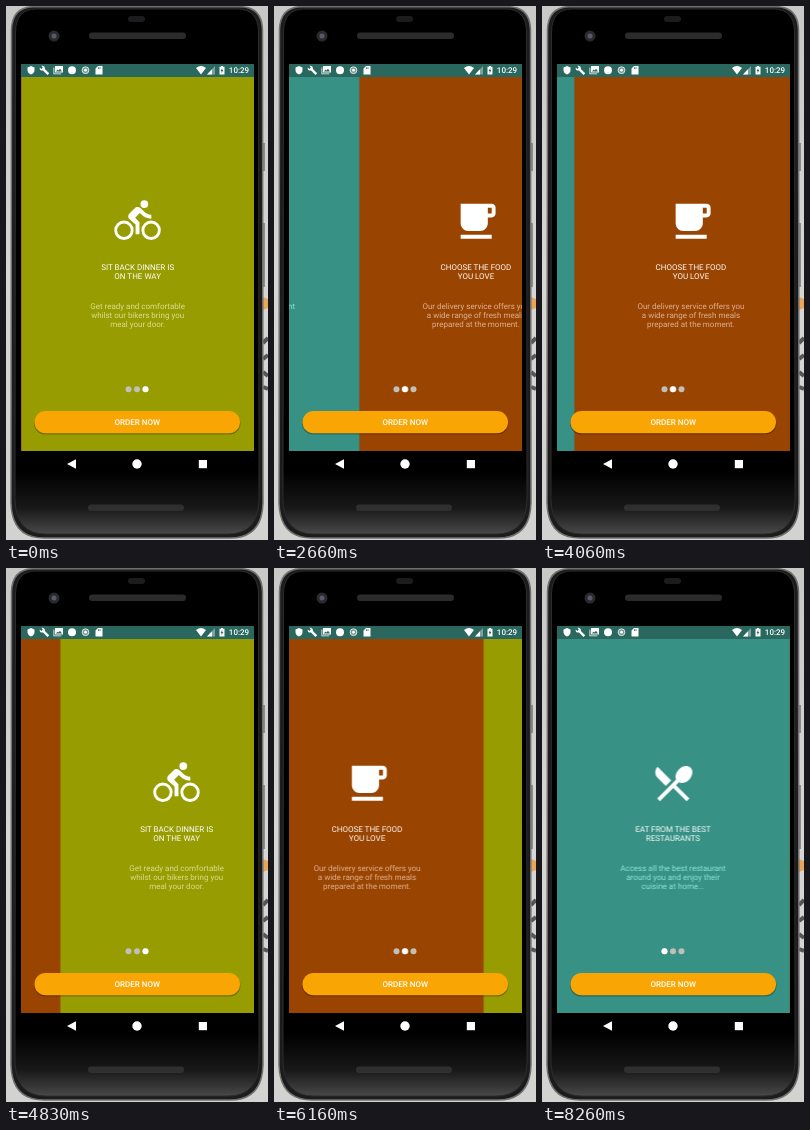
Recreate the animation shown at these times as an HTML page. Size 262 by 534 pixels, loop 8.33 s.

```html
<!DOCTYPE html>
<html lang="en">
<head>
<meta charset="utf-8">
<title>Food delivery onboarding</title>
<style>
  html, body { margin: 0; height: 100%; overflow: hidden; background: #cbcbca; }
  svg { display: block; width: 100vw; height: 100vh; }
  text { font: 8px Roboto, Arial, sans-serif; fill: #fff; text-anchor: middle; text-rendering: geometricPrecision; }
  .label { font-weight: 500; }
  .olive .note { fill: #dbde8e; }
  .brown .note { fill: #e2b294; }
  .teal .note { fill: #8ee8d8; }

  .strip, .current { animation: swipe 8330ms infinite; }
  .strip { animation-timing-function: cubic-bezier(.2, .7, .3, 1); }
  .current { animation-name: select; animation-timing-function: step-end; }

  /* Each swipe: finger drag, release, settle. One page is 233px wide. */
  @keyframes swipe {
    0% { transform: translateX(-466px); animation-timing-function: linear; }
    2.4% { transform: translateX(-376px); }
    8.4%, 10.08% { transform: translateX(-233px); }
    10.08% { animation-timing-function: ease-in; }
    14.17% { transform: translateX(-325px); }
    20.17%, 21.85% { transform: translateX(-466px); }
    21.85%, 22.69% { animation-timing-function: linear; }
    22.69% { transform: translateX(-435.5px); }
    24.73% { transform: translateX(-360px); }
    30.25%, 31.09% { transform: translateX(-233px); }
    31.09% { animation-timing-function: ease-in; }
    34.45% { transform: translateX(-130px); }
    39.5%, 42.86% { transform: translateX(0); }
    42.86% { animation-timing-function: ease-in; }
    46.22% { transform: translateX(-100px); }
    52.1%, 52.94% { transform: translateX(-233px); }
    52.94% { animation-timing-function: ease-in; }
    56.42% { transform: translateX(-350px); animation-timing-function: linear; }
    57.98% { transform: translateX(-426px); }
    61.34%, 63.87% { transform: translateX(-466px); }
    63.87% { animation-timing-function: ease-in; }
    69.63% { transform: translateX(-365px); animation-timing-function: linear; }
    73.95% { transform: translateX(-272px); }
    76.47%, 76.83% { transform: translateX(-233px); }
    76.83% { animation-timing-function: ease-in; }
    80.67% { transform: translateX(-120px); animation-timing-function: linear; }
    83.19% { transform: translateX(-15px); }
    86.55%, 100% { transform: translateX(0); }
  }
  @keyframes select {
    0%, 14.17%, 56.42% { transform: translateX(17px); }
    2.4%, 24.73%, 46.22%, 69.63% { transform: translateX(8.5px); }
    34.45%, 80.67%, 100% { transform: translateX(0); }
  }
</style>
</head>
<body>
<svg viewBox="0 0 262 534" preserveAspectRatio="none">
  <defs>
    <clipPath id="screen"><path d="M15 71h233v373.5H15z"/></clipPath>
    <linearGradient id="wall" x2="0" y2="1">
      <stop stop-color="#c8c8c7"/><stop offset=".5" stop-color="#d6d6d5"/><stop offset="1" stop-color="#d2d2d1"/>
    </linearGradient>
    <linearGradient id="glass" x2="0" y2="1">
      <stop offset=".88"/><stop offset=".95" stop-color="#181818"/><stop offset="1" stop-color="#484848"/>
    </linearGradient>
  </defs>

  <!-- Surroundings -->
  <path fill="url(#wall)" d="M0 0h262v534H0z"/>
  <path fill="#e9a65a" d="M257 291l5 2v9l-5 2z"/>
  <path fill="none" stroke="#555557" stroke-width="4" d="M257 337l5-5M257 353l5-4M257 366l5 4M257 381l5 2"/>

  <!-- Phone -->
  <path fill="#8c8c8c" d="M256 137h3v28h-3zM256 217h3v64h-3z"/>
  <path fill="#1c1c1c" stroke="#707070" stroke-width="1.5" d="M28 .7H234Q256 .7 256.500 24L257 497Q256 532 224 532H38Q6 532 5 497L5.500 24Q6 .7 28 .7z"/>
  <path fill="url(#glass)" stroke="#2c2c2c" d="M30 3H232Q252 3 252.500 26L253 494Q252 528 222 528H40Q10 528 9 494L9.500 26Q10 3 30 3z"/>
  <rect x="83" y="26.500" width="97" height="6.500" rx="3.200" fill="#2b2b2c"/>
  <rect x="82" y="498.500" width="96" height="6.500" rx="3.200" fill="#2f2f30"/>
  <rect x="122" y="10" width="17" height="6" rx="3" fill="#1c1c1e"/>
  <circle cx="48" cy="30" r="5.500" fill="#2a2a2d"/>
  <circle cx="48" cy="30" r="2.500" fill="#555a6c"/>

  <!-- Pages -->
  <g clip-path="url(#screen)">
    <g class="strip">
      <g class="teal">
        <path fill="#379185" d="M14 71h235v374H14z"/>
        <path fill="#fff" transform="translate(108 192) scale(1.94)" d="M8.1 13.34l2.83-2.83L3.91 3.5c-1.56 1.56-1.56 4.09 0 5.66zM14.88 11.53c1.53.71 3.68.21 5.27-1.38 1.91-1.91 2.28-4.65.81-6.12-1.46-1.46-4.2-1.1-6.12.81-1.59 1.59-2.09 3.74-1.38 5.27L3.7 19.87l1.41 1.41L12 14.41l6.88 6.88 1.41-1.41L13.41 13z"/>
        <text x="131" y="263.7">EAT FROM THE BEST</text>
        <text x="131" y="273.1">RESTAURANTS</text>
        <text class="note" x="131" y="302.5">Access all the best restaurant</text>
        <text class="note" x="131" y="311.8">around you and enjoy their</text>
        <text class="note" x="131" y="321.1">cuisine at home...</text>
      </g>
      <g class="brown" transform="translate(233)">
        <path fill="#994400" d="M15 71h234v374H15z"/>
        <path fill="#fff" fill-rule="evenodd" transform="translate(108.5 192) scale(1.94)" d="M20 3H4v10c0 2.21 1.79 4 4 4h6c2.21 0 4-1.79 4-4v-3h2c1.11 0 2-.89 2-2V5c0-1.11-.89-2-2-2zm0 5h-2V5h2zM4 19h16v2H4z"/>
        <text x="131.5" y="263.7">CHOOSE THE FOOD</text>
        <text x="131.5" y="273.1">YOU LOVE</text>
        <text class="note" x="131.5" y="302.5">Our delivery service offers you</text>
        <text class="note" x="131.5" y="311.8">a wide range of fresh meals</text>
        <text class="note" x="131.5" y="321.1">prepared at the moment.</text>
      </g>
      <g class="olive" transform="translate(466)">
        <path fill="#979c00" d="M15 71h234v374H15z"/>
        <g fill="#fff" transform="translate(107.8 191.3) scale(1.94)">
          <g fill="none" stroke="#fff" stroke-width="1.5">
            <circle cx="5" cy="17" r="4.25"/><circle cx="19" cy="17" r="4.25"/>
          </g>
          <circle cx="15.5" cy="3.5" r="2"/>
          <path d="M10.8 10.5l2.4-2.4.8.8c1.3 1.3 3 2.1 5.1 2.1V9c-1.5 0-2.7-.6-3.6-1.5l-1.9-1.9c-.5-.4-1-.6-1.6-.6s-1.1.2-1.4.6L7.8 8.4c-.4.4-.6.9-.6 1.4 0 .6.2 1.1.6 1.4L11 14v5h2v-6.2z"/>
        </g>
        <text x="131.2" y="263.7">SIT BACK DINNER IS</text>
        <text x="131.2" y="273.1">ON THE WAY</text>
        <text class="note" x="131.2" y="302.5">Get ready and comfortable</text>
        <text class="note" x="131.2" y="311.8">whilst our bikers bring you</text>
        <text class="note" x="131.2" y="321.1">meal your door.</text>
      </g>
    </g>
  </g>

  <!-- Page dots and button -->
  <g fill="#c0c0b8">
    <circle cx="122.5" cy="383.3" r="3"/><circle cx="131" cy="383.3" r="3"/><circle cx="139.5" cy="383.3" r="3"/>
  </g>
  <circle class="current" cx="122.5" cy="383.3" r="3" fill="#fff"/>
  <rect x="28" y="406.5" width="206.5" height="22" rx="11" fill="#000" opacity=".28"/>
  <rect x="28.5" y="405" width="205.5" height="22.3" rx="11.1" fill="#f9a504"/>
  <text class="label" x="131.3" y="419">ORDER NOW</text>

  <!-- Status bar -->
  <path fill="#29675f" d="M15 58h233v13H15z"/>
  <g fill="#fff">
    <path d="M25 60l3.5 1.5v2.5q0 3-3.5 4.5-3.5-1.5-3.5-4.5v-2.5z"/>
    <path d="M37 64.5l4.5 4.5 1.7-1.7-4.3-4.3q.3-2.800-2.500-3.300h-1l1.400 1.700-1.400 1.500-1.700-1.500q-.5 3.500 3.300 3.100z"/>
    <path fill-rule="evenodd" d="M49 60h8v6.500h-8zm1 5.500h6l-2-2.700-1.500 1.700-1-1zM47.500 61.500h.8v6h7v.8h-7.800z"/>
    <circle cx="66" cy="64.2" r="4"/>
    <circle cx="79.5" cy="64.2" r="3.4" fill="#789b96" stroke="#dbe7e5"/>
    <circle cx="79.5" cy="64.2" r="1.4"/>
    <path fill-rule="evenodd" d="M92 60h4.500v8.500h-7v-6zm0 1.300h.8v1.700H92zm1.600 0h.8v1.700h-.8z"/>
    <path d="M190 62q5-4 10 0l-5 6.500z"/>
    <path opacity=".4" d="M209 60v8.500h-8z"/>
    <path d="M206 63.200v5.300h-5z"/>
    <path fill-rule="evenodd" d="M215 60h2v.8h1.500v7.700h-5v-7.700h1.500zm1.300 2l-1.700 3h1v2.300l1.700-3.200h-1z"/>
  </g>
  <text class="label" x="233" y="67.2">10:29</text>

  <!-- Navigation bar -->
  <g fill="#fff">
    <path d="M61 458l9-4.800v9.600z"/>
    <circle cx="131" cy="458" r="4.7"/>
    <path d="M192.800 454h8.200v8.200h-8.200z"/>
  </g>
</svg>
</body>
</html>
```
